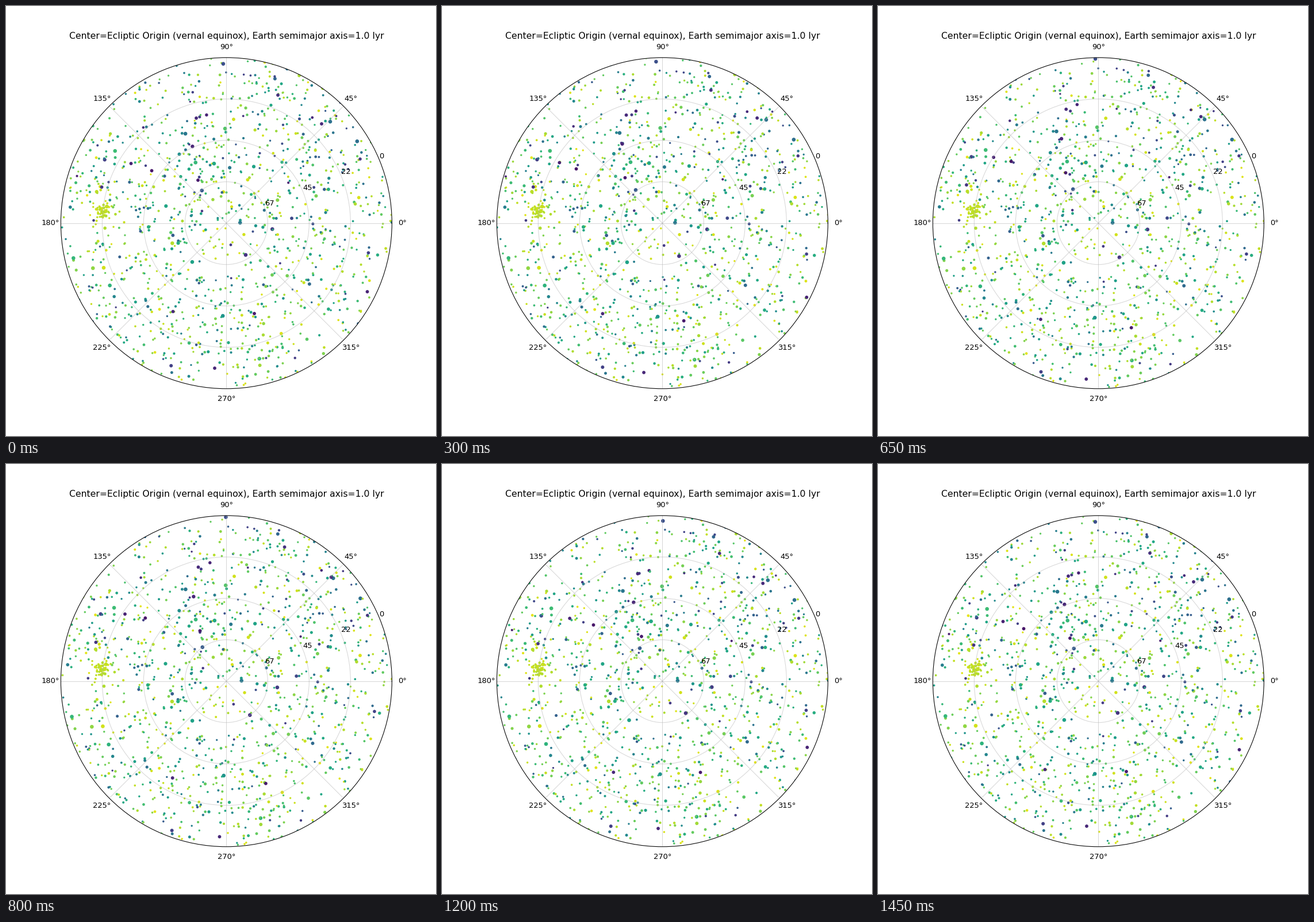
Animation of 748x748 px, one loop 1.5 s. Source, as a matplotlib script:

```python
import numpy as np
import matplotlib.pyplot as plt
from matplotlib.animation import FuncAnimation

INCHES, DPI = 8, 93.5
FRAMES, INTERVAL = 30, 50
CX, CY, RADIUS = 383.35, 377.74, 287.98   # sky disc in stage pixels
START = 0.19                              # Earth's angle on its orbit at the start
NEAREST, FAR, COLOR_MAX = 14, 163, 170    # light years

# The most restless stars: x, y at the start and distance
NEAR = [
    (473, 155, 24), (334, 303, 11.9), (549, 205, 20), (290.5, 531.5, 19.6),
    (628.5, 497, 17), (432, 535, 11.5), (363, 630, 18.8), (217.5, 274, 16.3),
    (253.5, 286.5, 10.5), (331, 195, 20), (166.5, 315, 26), (497, 369.3, 37),
]


def earth(frame):
    """Earth's place as (towards disc centre, right, up)."""
    a = START + 2 * np.pi * frame / (FRAMES - 1)
    return np.array([-np.cos(a), np.sin(a), 0])


def place(x, y, dist):
    """Position in space of stars seen at stage pixel x, y at the start."""
    dx, dy = x - CX, CY - y
    rho = np.hypot(dx, dy) / RADIUS * np.pi / 2
    theta = np.arctan2(dy, dx)
    ray = np.column_stack([np.cos(rho), np.sin(rho) * np.cos(theta),
                           np.sin(rho) * np.sin(theta)])
    home = earth(0)
    along = ray @ home
    reach = -along + np.sqrt(along**2 + dist**2 - 1)
    return ray * reach[:, None] + home


def field(rng, n):
    """Stars spread evenly over slightly more than half the sky."""
    c = rng.uniform(-0.05, 1, n)
    t = rng.uniform(0, 2 * np.pi, n)
    s = np.sqrt(1 - c**2)
    dist = np.maximum(FAR * rng.random(n) ** (1 / 2.5), NEAREST)
    return np.column_stack([c, s * np.cos(t), s * np.sin(t)]) * dist[:, None]


def cluster(rng):
    spread = np.repeat([4.5, 13], [42, 24])
    x = 168.5 + rng.normal(0, spread)
    y = 355 + rng.normal(0, spread * 1.5)
    return place(x, y, rng.normal(154, 3, spread.size))


def dot_sizes(rng, dist):
    """Diameters in pixels; nearby stars tend to look brighter."""
    return np.minimum(3.3 + rng.exponential(0.5 * (1 + 40 / dist)), 6.6)


def project(frame):
    v = stars - earth(frame)
    rho = np.arccos(v[:, 0] / np.linalg.norm(v, axis=1))
    return np.column_stack([np.arctan2(v[:, 2], v[:, 1]), np.degrees(rho)])


rng = np.random.default_rng(11)
near = place(*np.array(NEAR).T)
stars = np.vstack([field(rng, 1300), cluster(rng), near])
distance = np.linalg.norm(stars, axis=1)
diameter = dot_sizes(rng, distance)
diameter[-len(near):] = 5.8

fig = plt.figure(figsize=(INCHES, INCHES), dpi=DPI)
ax = fig.add_subplot(projection="polar")
dots = ax.scatter(*project(0).T, s=(diameter * 72 / DPI) ** 2, c=distance,
                  cmap="viridis", vmin=0, vmax=COLOR_MAX, linewidths=0)
ax.set_ylim(0, 90)
ax.set_yticks([22.5, 45, 67.5, 90], ["67", "45", "22", "0"])
ax.grid(alpha=0.5)
ax.set_title("Center=Ecliptic Origin (vernal equinox), Earth semimajor axis=1.0 lyr")


def update(frame):
    dots.set_offsets(project(frame))
    return (dots,)


anim = FuncAnimation(fig, update, frames=FRAMES, interval=INTERVAL,
                     repeat=True, repeat_delay=0)
plt.show()
```
